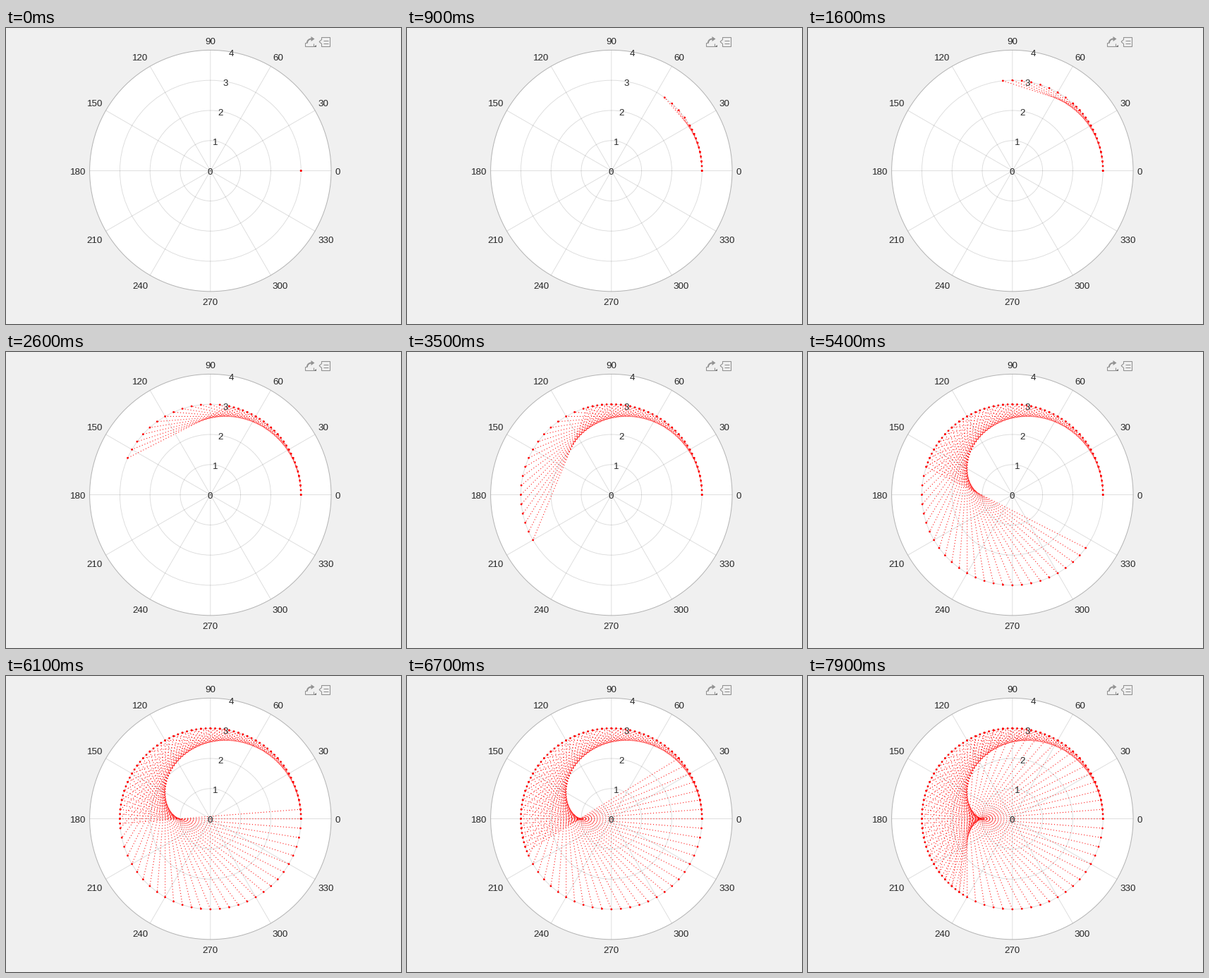
A matplotlib script that plays this animation: 560x420 px, repeating every 8000 ms.

```python
import numpy as np
import matplotlib.pyplot as plt
from matplotlib.animation import FuncAnimation
from matplotlib.patches import Circle, Polygon

W, H, DPI = 560, 420, 100
PX = 72 / DPI                # points per pixel
CX, CY = 289.8, 202.6        # centre of the polar axes
UNIT = 42.8                  # pixels per radial unit
FRAMES, STEP = 80, 3         # chord k joins 3k to 6k degrees
INK = "#262626"
ICON = "#929292"

fig = plt.figure(figsize=(W / DPI, H / DPI), dpi=DPI, facecolor="#f0f0f0")
ax = fig.add_axes([0, 0, 1, 1])
ax.set_xlim(0, W)
ax.set_ylim(H, 0)
ax.axis("off")


def polar(deg, r):
    t = np.radians(deg)
    return CX + UNIT * r * np.cos(t), CY - UNIT * r * np.sin(t)


def label(x, y, text, ha="center"):
    ax.text(x, y, text, ha=ha, va="baseline", color=INK, zorder=5,
            family="Liberation Sans", fontsize=13.33 * PX)


def draw_grid():
    ax.add_patch(Circle((CX, CY), 4 * UNIT, fc="white", ec="none", zorder=0))
    grid = dict(alpha=0.16, lw=0.9 * PX, zorder=1)
    for r in (1, 2, 3):
        ax.add_patch(Circle((CX, CY), r * UNIT, fill=False, ec=INK, **grid))
    for deg in range(0, 360, 30):
        x, y = polar(deg, 4)
        ax.plot([CX, x], [CY, y], color=INK, snap=False, **grid)
    ax.add_patch(Circle((CX, CY), 4 * UNIT, fill=False, ec="#b4b4b4",
                        lw=PX, zorder=2))


def draw_labels():
    for deg in range(0, 360, 30):
        x, y = polar(deg, 4.12)
        c, s = np.cos(np.radians(deg)), np.sin(np.radians(deg))
        ha = "center" if abs(c) < 0.1 else "left" if c > 0 else "right"
        dy = 5.6 if abs(s) < 0.1 else -3.6 if s > 0 else 14.4
        label(x, y + dy, str(deg), ha)
    for r in range(5):
        x, y = polar(80, r)
        label(x - 0.6, y + 5.6, str(r))


def stroke(xs, ys, lw=1.1):
    ax.plot(xs, ys, color=ICON, lw=lw * PX, solid_capstyle="butt",
            solid_joinstyle="miter")


def draw_icons():
    # export: tray, curved arrow, menu corner
    stroke([426.5, 423.5, 423.5, 435.5, 435.5], [20.5, 20.5, 25.5, 25.5, 21.5])
    t = np.linspace(0, np.pi / 2, 12)
    stroke(433 - 6 * np.cos(t), 21 - 5.5 * np.sin(t), 2)
    ax.add_patch(Polygon([(432.5, 12), (437.5, 15.5), (432.5, 19)],
                         fc=ICON, lw=0))
    ax.add_patch(Polygon([(439.5, 23.5), (439.5, 27), (436, 27)],
                         fc="#777777", lw=0))
    # data tip: box with a pointer and text lines
    stroke([444, 447.5, 447.5, 459.5, 459.5, 447.5, 447.5, 444],
           [19.5, 16.5, 13.5, 13.5, 26.5, 26.5, 22.5, 19.5])
    for y in (17.5, 21.5):
        stroke([450, 457], [y, y])


def make_chord(k):
    x, y = polar(np.array([STEP * k, 2 * STEP * k]), 3)
    width = 1.1
    line, = ax.plot(x, y, color="red", lw=width * PX, zorder=3, snap=False,
                    ls=(0, (1 / width, 3 / width)))
    dots = [ax.add_patch(Circle(p, 1.4, fc="red", lw=0, zorder=4))
            for p in zip(x, y)]
    return [line, *dots]


draw_grid()
draw_labels()
draw_icons()
chords = [make_chord(k) for k in range(FRAMES)]


def update(i):
    for k, chord in enumerate(chords):
        for part in chord:
            part.set_visible(k <= i)


anim = FuncAnimation(fig, update, frames=FRAMES, interval=100,
                     repeat=True, repeat_delay=0, blit=False)
plt.show()
```
